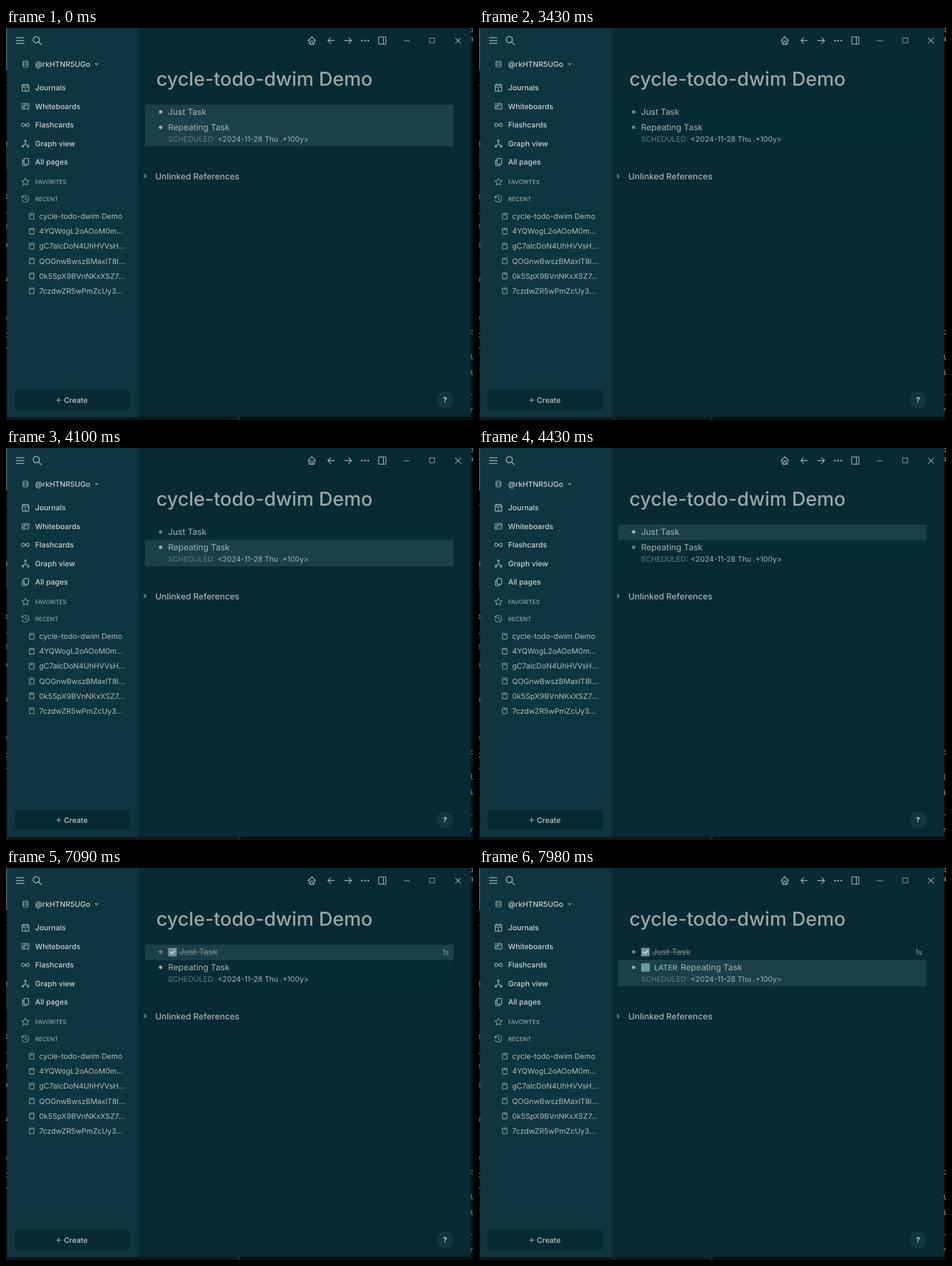
Animation of 817x686 px, one loop 8000 ms. Source, as an HTML page:

```html
<!DOCTYPE html>
<html lang="en">
<head>
<meta charset="utf-8">
<title>cycle-todo-dwim Demo</title>
<style>
  html, body { margin: 0; width: 100%; height: 100%; overflow: hidden; background: #0b0d0e; }
  svg { display: block; width: 817px; height: 686px; }
  text { font-family: Inter, "Noto Sans", sans-serif; font-optical-sizing: none; white-space: pre;
    text-rendering: geometricPrecision; }
  .mono { font-family: "DejaVu Sans Mono", "Noto Sans Mono", monospace; }
  .icon { fill: none; stroke-linecap: round; stroke-linejoin: round; }
</style>
</head>
<body>
<svg id="stage" viewBox="0 0 817 686" xmlns="http://www.w3.org/2000/svg"></svg>
<script>
const NS = 'http://www.w3.org/2000/svg';
const stage = document.getElementById('stage');
const LOOP = 8000;
const SMALL = 12.95, ITEM = 13.05, BODY = 14.88, TITLE = 33.6;
const C = {
  main: '#072a33', side: '#0f3640', row: '#1b404a', text: '#a3b3b4', title: '#96a6a5',
  nav: '#c5d2d3', icon: '#9fb3b6', muted: '#8ba0a4', faint: '#5e797f', teal: '#6b9aa2'
};

function add(tag, attrs, parent = stage) {
  const el = document.createElementNS(NS, tag);
  for (const key in attrs) el.setAttribute(key, attrs[key]);
  parent.append(el);
  return el;
}
const rect = (x, y, width, height, fill, rx = 0, parent) =>
  add('rect', { x, y, width, height, fill, rx }, parent);
const dot = (cx, cy, r, fill, parent) => add('circle', { cx, cy, r, fill }, parent);
const icon = (d, stroke = C.icon, width = 1.3) =>
  add('path', { d, stroke, 'stroke-width': width, class: 'icon' });

// Text whose capitals are centred on cy.
function label(str, x, cy, size, fill, weight = 400, parent) {
  const el = add('text', { x, y: cy + size * 0.364, 'font-size': size, fill, 'font-weight': weight }, parent);
  el.textContent = str;
  return el;
}

// Circle as a path, so icons can be one shape.
const ring = (x, y, r) => `M${x - r} ${y}a${r} ${r} 0 1 0 ${2 * r} 0a${r} ${r} 0 1 0 ${-2 * r} 0`;
const box = (x, y, w, h) => `M${x + 1} ${y}h${w - 2}q1 0 1 1v${h - 2}q0 1 -1 1h${2 - w}q-1 0 -1 -1v${2 - h}q0 -1 1 -1z`;

function mono(str, x, y, size, anchor = 'start') {
  add('text', { x, y, 'font-size': size, fill: '#a5a5a5', class: 'mono', 'text-anchor': anchor })
    .textContent = str;
}

function drawBackdrop() {
  rect(0, 0, 817, 686, '#0b0d0e');
  rect(0, 0, 3, 74, '#3a5d6b');
  rect(0, 196, 3, 52, '#222626');
  rect(0, 680, 408, 6, '#141717');
  rect(407, 680, 1, 6, '#4a4d4d');
  [['-', 104], ['n', 207], ['p', 299], ['l', 325], ['e', 351], ['n', 384], ['u', 443],
    ['f', 515], ['c', 541], ['r', 567]].forEach(([ch, y]) => mono(ch, 3.5, y, 13, 'end'));
  [['o', 7], ['a', 23], ['c', 536], ['l', 580], ['i', 607], ['-', 645], ['r', 672]]
    .forEach(([ch, y]) => mono(ch, 811, y, 12));
  mono('t Check#l Source => For Code for/yx/Make sure to/done/more/yx', 466, 694.8, 11.5);
}

function drawWindow() {
  rect(2, 0, 811.5, 680.5, C.main);
  rect(2, 0, 230, 680.5, C.side);
  rect(231.5, 0, 1, 680.5, '#0a303a');

  icon('M18 17h13.5M18 22h13.5M18 27h13.5');
  icon(ring(53, 20.5, 5.5) + 'M57.2 24.7L61.8 29.3', C.icon, 1.5);

  icon('M528.5 22L535 15.2L541.5 22M530.3 20.5V27q0 1.5 1.5 1.5h6.4q1.5 0 1.5 -1.5V20.5M533 28.3V24q0 -1 1 -1h2q1 0 1 1v4.3');
  icon('M574.5 22H563M568 17L563 22L568 27');
  icon('M592.5 22H604.5M599.5 17L604.5 22L599.5 27');
  [622.8, 628.3, 633.8].forEach(x => dot(x, 22, 1.5, C.icon));
  icon(box(652, 15.7, 12.6, 12.6) + 'M660.3 15.7v12.6');
  icon('M696.5 22.5h9.5', C.icon, 1);
  icon('M741.5 17.5h8.5v8.5h-8.5z', C.icon, 1);
  icon('M786 17.3l9.5 9.5M795.5 17.3l-9.5 9.5', C.icon, 1.2);
}

function drawSidebar() {
  icon('M29.7 59.5a4.3 1.8 0 1 0 8.6 0a4.3 1.8 0 1 0 -8.6 0v7a4.3 1.8 0 0 0 8.6 0v-7M29.7 63a4.3 1.8 0 0 0 8.6 0', C.icon, 1.1);
  label('@rkHTNR5UGo', 51, 63, SMALL, C.nav, 500);
  add('path', { d: 'M154.5 61.8h8l-4 4z', fill: '#6b858a' });

  ['Journals', 'Whiteboards', 'Flashcards', 'Graph view', 'All pages']
    .forEach((name, i) => label(name, 51, 104.5 + i * 32.55, SMALL, C.nav, 500));
  icon(box(28.3, 99.5, 11.5, 11) + 'M28.3 103.3h11.5M31.3 97.8v3M36.8 97.8v3M33.2 106.3h1v2.2');
  icon(box(28, 132, 12, 10) + 'M28 139h4v3M31 134.5h3v2.5h-3zM36 132v3h4M36 139.5h2', C.icon, 1.1);
  icon('M34 169.7c-1.5 -2 -2.5 -2.8 -3.8 -2.8a2.8 2.8 0 0 0 0 5.6c1.3 0 2.3 -.8 3.8 -2.8s2.5 -2.8 3.8 -2.8a2.8 2.8 0 0 1 0 5.6c-1.3 0 -2.3 -.8 -3.8 -2.8');
  icon(ring(34, 197.3, 1.5) + ring(29.5, 207, 1.5) + ring(38.7, 207, 1.5) + 'M34 199v3.5L30.5 205.7M34 202.5L37.6 205.7');
  icon(box(31.5, 228.3, 8, 10) + 'M31 231.3h-1q-1.2 0 -1.2 1.2v7q0 1.3 1.3 1.3h5.3q1.2 0 1.2 -1.5');

  let star = '';
  for (let i = 0; i < 10; i++) {
    const a = i * Math.PI / 5 - Math.PI / 2, r = i % 2 ? 3.3 : 6.6;
    star += `${i ? 'L' : 'M'}${34 + r * Math.cos(a)} ${269.3 + r * Math.sin(a)}`;
  }
  icon(star + 'z', C.muted, 1.1);
  icon('M28.3 296.5a6 6 0 1 1 -.2 4M28 293.8v3h3M34 295.5v3.8l2.3 1.5', C.muted, 1.1);
  label('FAVORITES', 51, 269.3, 10.2, C.muted, 500);
  label('RECENT', 51, 299.3, 10.2, C.muted, 500);

  ['cycle-todo-dwim Demo', '4YQWogL2oAOoM0m…', 'gC7alcDoN4UhHVVsH…',
    'QOGnwBwszBMaxlT8l…', '0k5SpX9BVnNKxXSZ7…', '7czdwZR5wPmZcUy3…'].forEach((name, i) => {
    const y = 329.5 + i * 26.1;
    icon(box(41, y - 5, 8, 10) + `M43.3 ${y - 2.6}h3.4`, C.icon, 1.1);
    label(name, 58, y, ITEM, '#abbcbe');
  });

  rect(15.5, 633, 202, 35.5, '#082a33', 4);
  icon('M88.2 651.2h7.6M92 647.4v7.6', '#b3c3c5', 1.1);
  label('Create', 101.3, 651, ITEM, '#b6c5c7', 500);
}

// One outline row: highlight, bullet and a group per task state.
function makeRow(name, top, height, cy) {
  const back = rect(243, top, 540, height, C.row);
  const bullet = dot(270.5, cy, 3);
  const states = {};
  const group = key => states[key] = add('g', {});

  label(name, 283.5, cy, BODY, C.text, 400, group('plain'));

  for (const [key, x] of [['LATER', 352.7], ['NOW', 345.7]]) {
    const g = group(key);
    rect(283.7, cy - 7, 15, 14.8, C.teal, 1, g);
    label(key, 306.5, cy + .3, SMALL, '#7fa5ab', 600, g);
    label(name, x, cy, BODY, C.text, 400, g);
  }

  const done = group('DONE');
  rect(283.7, cy - 7, 15, 14.8, '#6f939d', 1, done);
  add('path', { d: `M287.5 ${cy + .6}l2.6 2.6l5 -5.4`, stroke: '#dfe8e9', 'stroke-width': 1.6, class: 'icon' }, done);
  label(name, 303, cy, BODY, '#718a8e', 400, done);
  rect(303, cy - .2, 67, 1.1, '#718a8e', 0, done);
  label('1s', 775.3, cy + .8, SMALL, '#8fa3a6', 400, done).setAttribute('text-anchor', 'end');

  return { back, bullet, states };
}

drawBackdrop();
drawWindow();
drawSidebar();
const hoverDots = add('g', {});
[208, 211, 214].forEach(x => dot(x - .5, 434.3, .8, '#55747a', hoverDots));

label('cycle-todo-dwim Demo', 263, 89, TITLE, C.title, 500);
const rows = [makeRow('Just Task', 134, 27, 146.8), makeRow('Repeating Task', 161, 46, 173.8)];
label('SCHEDULED:', 283.5, 194.6, SMALL, C.faint);
label('<2024-11-28 Thu .+100y>', 370.3, 194.6, SMALL, '#9fb1b2');
add('path', { d: 'M241.5 254.5v9.5l5.5 -4.75z', fill: '#56717a' });
label('Unlinked References', 261.3, 259.4, BODY, C.text, 500);
dot(768, 650.5, 14.7, '#12373f');
label('?', 764.4, 650.7, 12.5, '#bccaca', 700);

// Timelines: [start in ms, value]. Highlights keep a trace after they go out.
const TRACE = .08;
const timelines = [
  {
    back: [[0, 1], [3430, TRACE], [4430, 1], [7200, TRACE / 2]],
    bullet: [[0, 1], [3320, 0], [4320, 1], [7090, 0]],
    state: [[0, 'plain'], [5210, 'LATER'], [5760, 'NOW'], [6430, 'DONE']]
  },
  {
    back: [[0, 1], [3430, TRACE], [3770, 1], [4430, TRACE], [7200, 1]],
    bullet: [[0, 1], [3320, 0], [3660, 1], [4320, 0], [7090, 1]],
    state: [[0, 'plain'], [7870, 'LATER']]
  }
];
const valueAt = (steps, t) => steps.filter(([start]) => start <= t).pop()[1];
const show = (el, on) => el.setAttribute('visibility', on ? 'visible' : 'hidden');

function render(t) {
  rows.forEach((row, i) => {
    const line = timelines[i], state = valueAt(line.state, t);
    row.back.setAttribute('opacity', valueAt(line.back, t));
    row.bullet.setAttribute('fill', valueAt(line.bullet, t) ? '#9aadb0' : '#68838a');
    for (const key in row.states) show(row.states[key], key === state);
  });
  show(hoverDots, t >= 2220 && t < 2440);
}

const begin = performance.now();
function tick() {
  render((performance.now() - begin) % LOOP);
  requestAnimationFrame(tick);
}
tick();
</script>
</body>
</html>
```
